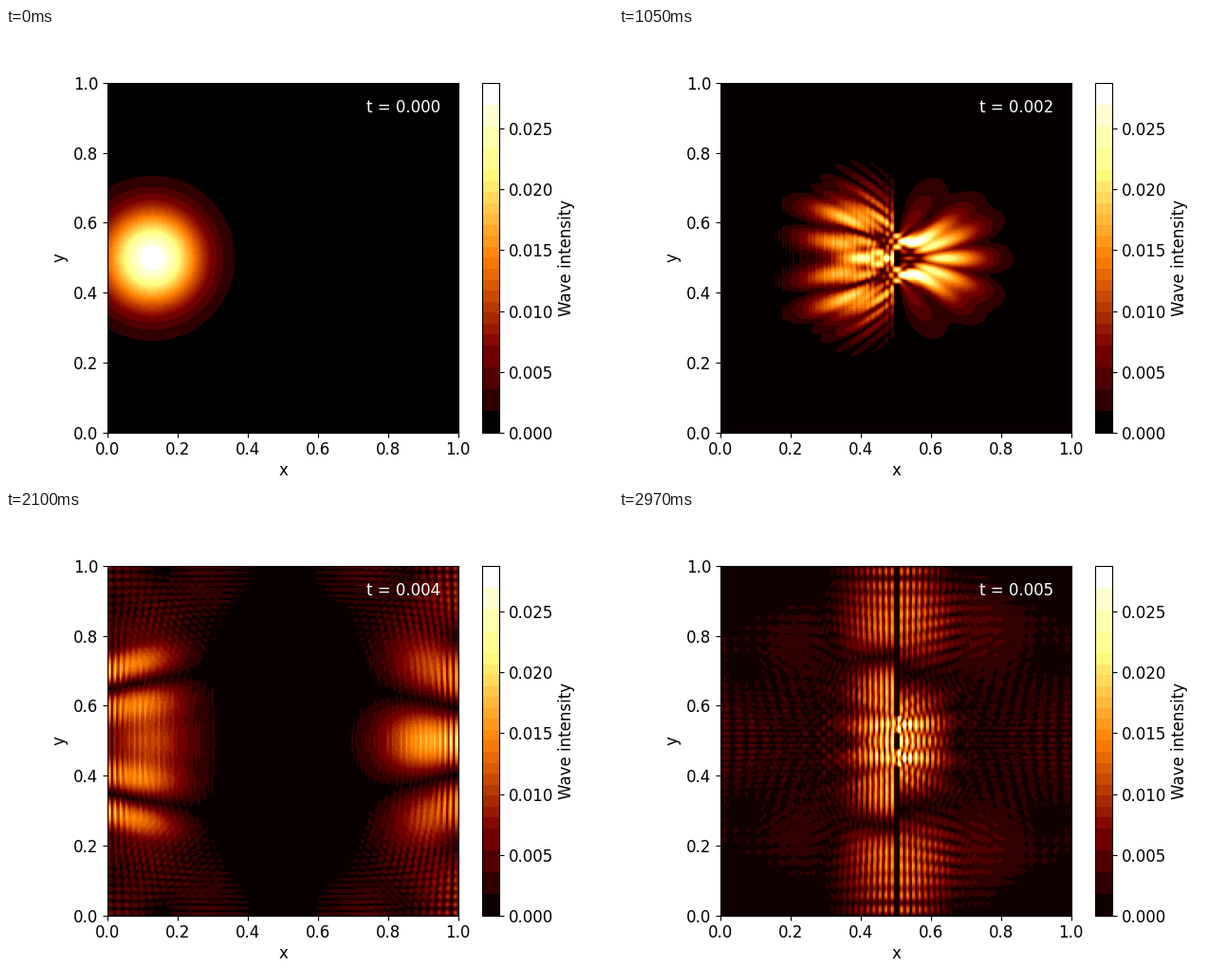
These frames come from a looping animation (640 by 480 pixels, 3 s). A matplotlib script:

```python
import numpy as np
import matplotlib.pyplot as plt
from matplotlib.animation import FuncAnimation
from matplotlib.colors import ListedColormap

# Double slit: i u_t = -laplace(u), hard walls, Crank-Nicolson in sine space
N, H, DT = 200, 0.005, 2.5e-5
FRAMES, SUBSTEPS = 100, 2
XC, YC, SIGMA, P = 0.125, 0.5, 0.1, 200.0
BANDS = 32


def solve():
    """Return |u| on the (y, x) grid for every frame."""
    idx = np.arange(N)
    k = idx + 1
    S = np.sqrt(2 / (N + 1)) * np.sin(np.pi * np.outer(k, k) / (N + 1))
    e = (2 - 2 * np.cos(np.pi * k / (N + 1))) / H**2
    inv = 1 / (1 + 0.5j * DT * (e[:, None] + e[None, :]))

    # Thin barrier with two openings
    off = np.abs(idx - 100)
    cols = idx[off <= 1]
    rows = idx[(off < 5) | (off > 14)]
    Sc, Sr = S[cols], S[rows]

    # Response of the barrier cells to unit sources on them
    G = np.block([[(Sr * ((a * b) @ inv)) @ Sr.T for b in Sc] for a in Sc])
    react = np.linalg.inv(G)

    x = idx * H
    u = np.outer(np.exp(-(x - XC)**2 / (2 * SIGMA**2) + 1j * P * (x - XC)),
                 np.exp(-(x - YC)**2 / (2 * SIGMA**2)))
    u[np.ix_(cols, rows)] = 0
    u /= np.sqrt(np.sum(np.abs(u)**2))

    U = S @ u @ S
    out = []
    for _ in range(FRAMES):
        out.append(np.abs(S @ U @ S).T)
        for _ in range(SUBSTEPS):
            U = (2 * inv - 1) * U
            wall = Sc @ U @ Sr.T
            q = (react @ wall.ravel()).reshape(wall.shape)
            U = U - inv * (Sc.T @ q @ Sr)
    return out


def stepped_cmap(dark):
    """Stepped afmhot: wide bands at both ends, narrow ones between."""
    edges = np.r_[0:8:2, 8:24, 24:33:2]
    mids = (edges[1:] + edges[:-1]) / (2 * BANDS)
    colors = plt.get_cmap("afmhot")(mids)
    colors[0] = (dark, 0, 0, 1)
    colors[-1] = (1, 1, 1, 1)
    return ListedColormap(np.repeat(colors, np.diff(edges), axis=0))


def dark_level(z):
    low = z[z < 2 * vmax / BANDS]
    return 2 * low.mean() / vmax


waves = solve()
vmax = waves[0].max()

plt.rcParams["font.family"] = "DejaVu Sans"
plt.rcParams["font.size"] = 12

fig, ax = plt.subplots(figsize=(6.4, 4.8), dpi=100)
img = ax.imshow(waves[0], extent=[0, 1, 0, 1], vmin=0, vmax=vmax,
                cmap=stepped_cmap(dark_level(waves[0])))
ax.tick_params(axis="x", pad=2.8)
ax.set_xlabel("x", labelpad=2.6)
ax.set_ylabel("y")
cbar = fig.colorbar(img, ax=ax)
cbar.set_label("Wave intensity", labelpad=3.3)
label = ax.text(0.95, 0.9525, "", color="white", ha="right", va="top")


def update(n):
    img.set_data(waves[n])
    img.set_cmap(stepped_cmap(dark_level(waves[n])))
    label.set_text(f"t = {n * SUBSTEPS * DT:.3f}")
    return img, label


anim = FuncAnimation(fig, update, frames=FRAMES, interval=30,
                     repeat=True, repeat_delay=0, blit=False)
plt.show()
```
